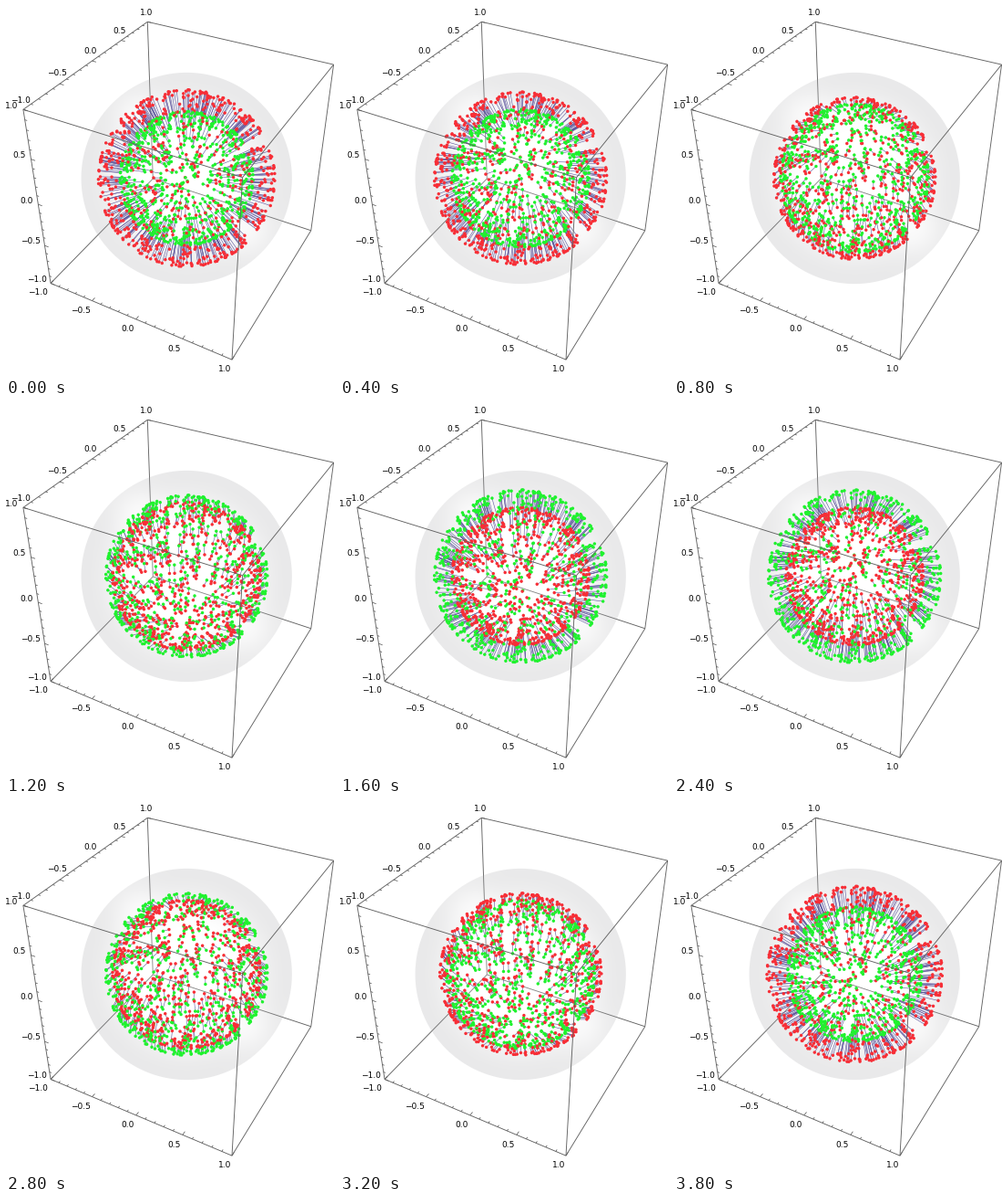
These frames come from a looping animation (360 by 405 pixels, 4000 ms). A matplotlib script:

```python
import numpy as np
import matplotlib.pyplot as plt
from matplotlib.animation import FuncAnimation
from matplotlib.collections import LineCollection

W, H, DPI = 360, 405, 72
FRAMES, INTERVAL = 20, 200
CENTER = np.array([198.2, 188.5])
SCALE = 774
EYE = np.array([2.6, -4.8, 4.0])
DIST = np.linalg.norm(EYE)
VIEW = EYE / DIST
RIGHT = np.cross([0, 0, 1], VIEW)
RIGHT /= np.linalg.norm(RIGHT)
UP = np.cross(VIEW, RIGHT)

PAIRS, RADIUS, ARM, SWAY = 750, 0.738, 0.102, 0.035
RED, GREEN = (0.97, 0.18, 0.21), (0.12, 0.95, 0.18)
LINK, EDGE = (0.34, 0.31, 0.6), (0.38, 0.38, 0.38)


def project(p):
    """Perspective view of 3D points, in stage pixels."""
    p = np.asarray(p, float)
    k = SCALE / (DIST - p @ VIEW)
    return np.stack([CENTER[0] + k * (p @ RIGHT), CENTER[1] - k * (p @ UP)], axis=-1)


fig = plt.figure(figsize=(W / DPI, H / DPI), dpi=DPI, facecolor="white")
ax = fig.add_axes([0, 0, 1, 1])
ax.axis("off")


def draw_lines(segments, z, width=0.9):
    ax.add_collection(LineCollection(segments, colors=[EDGE], linewidths=width, zorder=z))


def draw_box():
    back, front = [], []
    far = np.array([-1, 1, -1])
    for axis in range(3):
        for a in (-1, 1):
            for b in (-1, 1):
                p = np.insert([a, b], axis, -1)
                q = np.insert([a, b], axis, 1)
                hidden = (p == far).all() or (q == far).all()
                (back if hidden else front).append(project([p, q]))
    draw_lines(back, 1)
    draw_lines(front, 6)


def draw_axis(start, axis, inward, labels):
    start, inward = np.array(start, float), np.array(inward, float)
    ticks = []
    for i in range(21):
        p = start.copy()
        p[axis] = -1 + i / 10
        size = 0.045 if i % 5 == 0 else 0.024
        ticks.append(project([p, p + size * inward]))
    draw_lines(ticks, 6, 0.8)
    for value, (x, y) in zip((-1, -0.5, 0, 0.5, 1), labels):
        text = f"{value:.1f}".replace("-", "\u2212")
        ax.text(x, y, text, family="DejaVu Sans", size=9, color="black",
                ha="center", va="center", zorder=7)


def draw_sphere(alpha=0.25):
    rim = SCALE / np.sqrt(DIST**2 - 1)
    y, x = np.mgrid[0:H, 0:W] + 0.5
    dx, dy = (x - CENTER[0]) / rim, (y - CENTER[1]) / rim
    r = np.hypot(dx, dy)
    s = np.clip((r - 0.45) / 0.5, 0, 1)
    glow = sum(np.exp(-((dx - gx)**2 + (dy - gy)**2) / 0.06)
               for gx, gy in ((-0.46, -0.6), (0.58, 0.5)))
    shade = 0.085 * s * s * (3 - 2 * s) * (1 - 0.65 * np.clip(glow, 0, 1))
    img = np.ones((H, W, 4))
    img[..., :3] -= shade[..., None] / alpha * np.array([1, 1, 0.96])
    img[..., 3] = alpha * np.clip((1 - r) * rim + 0.5, 0, 1)
    ax.imshow(img, extent=(0, W, H, 0), interpolation="nearest", aspect="auto", zorder=2)


draw_box()
draw_axis((0, -1, -1), 0, (0, 1, 0),
          [(35, 313), (82, 333), (133.5, 353), (185, 375), (240.5, 398)])
draw_axis((-1, 0, 1), 1, (1, 0, 0),
          [(16, 103), (56, 74), (92.5, 49), (125, 27), (154, 7)])
draw_axis((-1, -1, 0), 2, (1, 0, 0),
          [(34, 299), (27, 258), (22.5, 213), (14.5, 164), (6.5, 110)])
draw_sphere()
ax.set_xlim(0, W)
ax.set_ylim(H, 0)

# Rods spread over a sphere, their ends moving on ellipses in the meridian plane
rng = np.random.default_rng(7)
cos_t = (2 * np.arange(PAIRS) + 1) / PAIRS - 1
sin_t = np.sqrt(1 - cos_t**2)
phi = rng.uniform(0, 2 * np.pi, PAIRS)
normal = np.stack([sin_t * np.cos(phi), sin_t * np.sin(phi), cos_t], axis=1)
south = np.stack([cos_t * np.cos(phi), cos_t * np.sin(phi), -sin_t], axis=1)
dot_colors = np.array([RED] * PAIRS + [GREEN] * PAIRS)

links = LineCollection([], colors=[LINK], linewidths=0.55, zorder=3)
ax.add_collection(links)
dots = ax.scatter(np.zeros(2 * PAIRS), np.zeros(2 * PAIRS), s=12, c=dot_colors,
                  linewidths=0, zorder=4)


def update(i):
    a = 2 * np.pi * i / FRAMES
    arm = ARM * np.cos(a) * normal + SWAY * np.sin(a) * south
    ends = np.concatenate([RADIUS * normal + arm, RADIUS * normal - arm])
    xy = project(ends)
    order = np.argsort(ends @ VIEW)
    dots.set_offsets(xy[order])
    dots.set_facecolors(dot_colors[order])
    links.set_segments(np.stack([xy[:PAIRS], xy[PAIRS:]], axis=1))
    return links, dots


anim = FuncAnimation(fig, update, frames=FRAMES, interval=INTERVAL,
                     init_func=lambda: update(0), repeat=True, repeat_delay=0)
plt.show()
```
